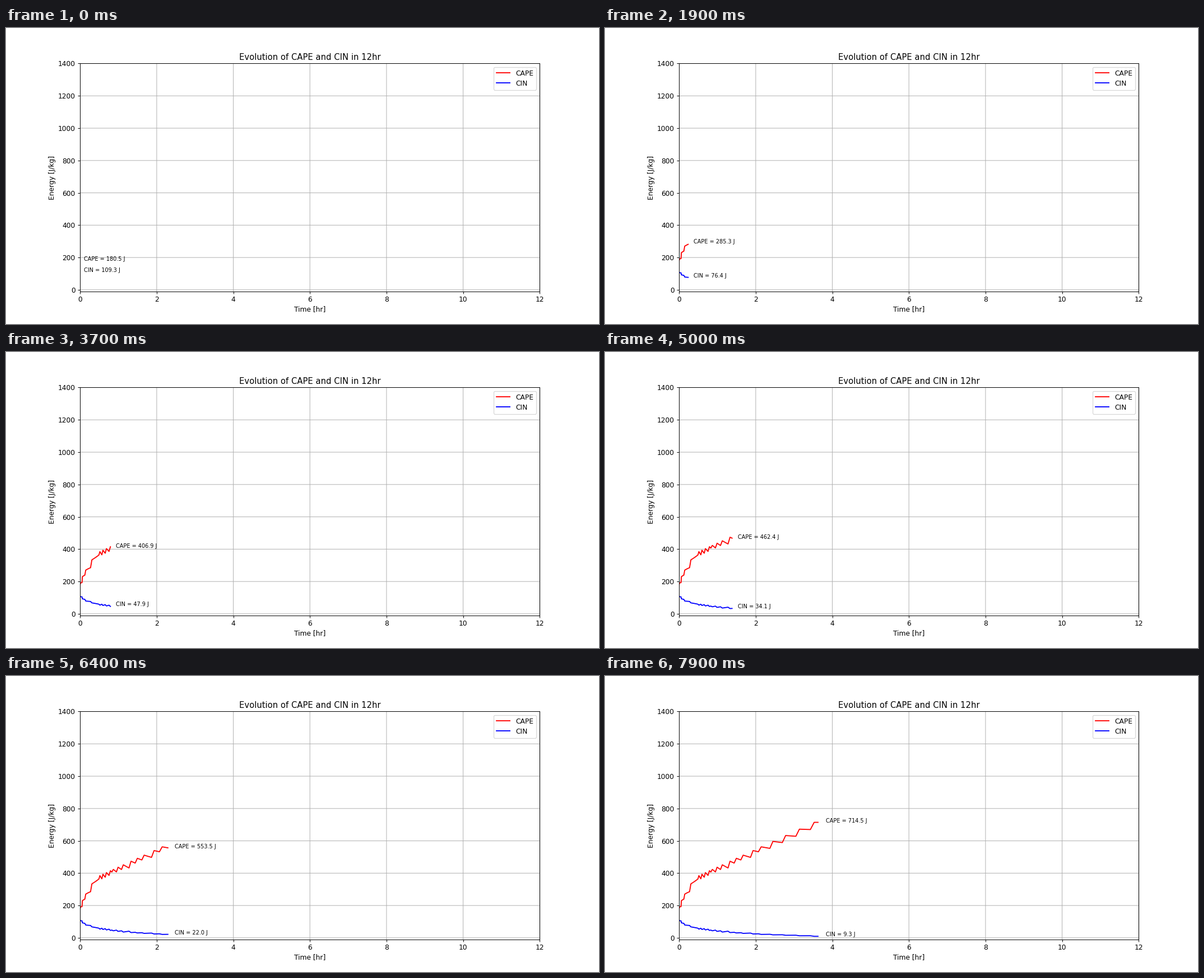
Write a matplotlib script that moves like this. It is 1058 px wide and 529 px high and loops after 8 s.

```python
import numpy as np
import matplotlib.pyplot as plt
from matplotlib.animation import FuncAnimation

FRAMES = 80
INTERVAL = 100

# The model's time step grows along the run
steps = np.arange(FRAMES)
dt = np.interp(steps, [0, 9, 19, 28, 54, 79], [.0055, .0055, .036, .025, .0606, .1023])
hours = np.cumsum(dt) - dt[0]

# CAPE jumps up to a rising trend at each peak, then drifts until the next one
k = np.arange(16)
peaks = np.concatenate([[0, 1, 10, 15, 20], (27.95 + 2.536 * k + .05 * k**2).astype(int)])
last = peaks[np.searchsorted(peaks, steps, side="right") - 1]
trend = np.interp(hours[last], [0, .006, .06, .148, .31, .516, 3.53],
                  [180.5, 192, 230.5, 271, 335, 385, 714.9])
drift = np.where(last < 27, .25 * last, -.2 * (77 - last))
cape = trend + drift * (steps - last)

# CIN falls as CAPE grows
cin = np.interp(cape, [180.5, 271, 335, 453, 556, 715], [109.3, 79, 67.5, 35.3, 21.7, 9.3])

fig, ax = plt.subplots(figsize=(12, 6), dpi=88.16667)
ax.set(xlim=(0, 12), ylim=(-10, 1400))
ax.set_title("Evolution of CAPE and CIN in 12hr", pad=5)
ax.set_xlabel("Time [hr]", labelpad=3.2)
ax.set_ylabel("Energy [J/kg]", labelpad=3.2)
ax.grid()
plt.setp(ax.get_xgridlines() + ax.get_ygridlines(), snap=False)


def make_series(name, values, color):
    line, = ax.plot([], [], color=color, label=name)
    label = ax.text(0, 0, "", fontsize=8)
    return name, values, line, label


series = [make_series("CAPE", cape, "red"), make_series("CIN", cin, "blue")]
ax.legend(loc="upper right", labelspacing=.42)


def update(i):
    artists = []
    for name, values, line, label in series:
        line.set_data(hours[:i], values[:i])
        label.set_position((hours[i] + 0.1, values[i]))
        label.set_text(f"{name} = {values[i]:.1f} J")
        artists += [line, label]
    return artists


anim = FuncAnimation(fig, update, frames=FRAMES, interval=INTERVAL, repeat=True)
plt.show()
```
